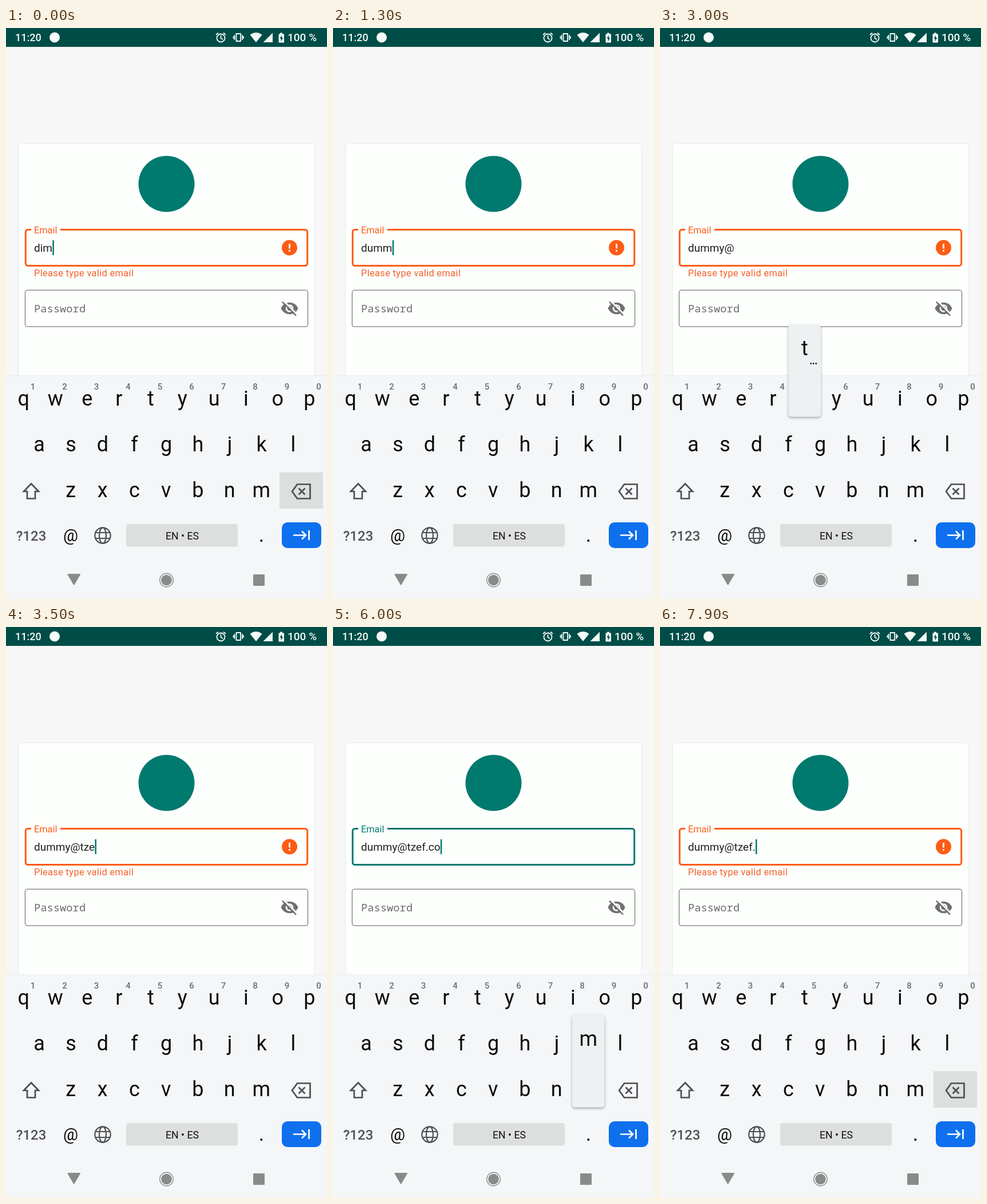
Animation, 561 px wide and 998 px high, one loop 8 s. Source, as an HTML page:

```html
<!DOCTYPE html>
<html lang="en">
<head>
<meta charset="utf-8">
<title>Email field validation</title>
<style>
  html, body { margin: 0; width: 100%; height: 100%; overflow: hidden; }
  svg { display: block; width: 561px; height: 998px; font-family: Roboto, sans-serif; }
  .key { font-size: 36px; text-anchor: middle; fill: #0b0c0c; }
  .hint { font-size: 15px; font-weight: 500; text-anchor: middle; fill: #6a6c6d; }
  .line { fill: none; stroke: #4c4e50; stroke-width: 2.7; }
  .status { font-weight: 500; fill: #f4fbf8; }
  #form { --tone: #00796f; }
  #form.error { --tone: #fd5c16; }
  #form:not(.error) #alert { display: none; }
  #outline { fill: none; stroke: var(--tone); stroke-width: 3; }
  #label { fill: var(--tone); font-size: 16.35px; }
  #popup { filter: drop-shadow(0 2px 2px #0005); }
</style>
</head>
<body>
<svg viewBox="0 0 561 998">
  <rect width="561" height="998" fill="#f6f7f6"/>
  <rect width="561" height="33" fill="#004d47"/>

  <g class="status">
    <text x="16" y="23" font-size="18">11:20</text>
    <text x="492" y="23" font-size="19">100 %</text>
    <circle cx="85" cy="16.500" r="9"/>
    <g fill="none" stroke="#f4fbf8" stroke-width="1.800">
      <circle cx="375.500" cy="17.500" r="7"/>
      <path d="M375.500 13v5l3.500 2M367 12l4-3.500M384 12l-4-3.500"/>
      <path d="M402.500 10h7.500v13h-7.500zM399.500 12v9M413 12v9M397.500 14.500v4M415 14.500v4"/>
    </g>
    <path d="M426.500 12Q437 4 447.500 12L437 25ZM449.500 25L466 8.500V25Z"/>
    <path d="M476.500 10.500h2.500v-2h4v2h3v15h-9.500z"/>
    <path d="M482 12.500l-3.500 6h2.200v5l3.500-6.500h-2.200z" fill="#004d47"/>
  </g>

  <rect x="22" y="202.500" width="517" height="420" rx="2" fill="#fdfffd" stroke="#e9ebea"/>
  <circle cx="280.500" cy="272.500" r="49" fill="#00796f"/>

  <g id="form">
    <rect id="outline" x="34.300" y="352.500" width="492.400" height="63" rx="4"/>
    <rect x="44" y="348" width="51" height="9" fill="#fdfffd"/>
    <text id="label" x="49" y="359">Email</text>
    <text id="value" x="49" y="391" font-size="19" fill="#1c1d1d"></text>
    <rect id="caret" y="371" width="2.500" height="26" fill="#00796f"/>
    <text id="message" x="49" y="434" font-size="16.350" letter-spacing=".37" fill="#f4602a">Please type valid email</text>
    <g id="alert">
      <circle cx="495.500" cy="384" r="13.500" fill="#fd5c16"/>
      <path d="M495.500 377v8.500M495.500 388v3" stroke="#fff" stroke-width="2.800"/>
    </g>
  </g>

  <rect x="33.500" y="458.300" width="494" height="63.700" rx="4" fill="none" stroke="#909190" stroke-width="1.600"/>
  <text x="49" y="496.500" font-size="18.800" fill="#6b6d6c" style="font-family:'Noto Sans Mono',monospace">Password</text>
  <g transform="translate(479.200 473.700) scale(1.360)">
    <path d="M1 12C2.700 7.600 7 4.500 12 4.500S21.300 7.600 23 12C21.300 16.400 17 19.500 12 19.500S2.700 16.400 1 12Z" fill="#6f7170"/>
    <circle cx="12" cy="12" r="5" fill="#fdfffd"/>
    <circle cx="12" cy="12" r="3" fill="#6f7170"/>
    <path d="M4.500 2.500L22 20" stroke="#fdfffd" stroke-width="2"/>
    <path d="M2.700 3.600L20.400 21.300" stroke="#6f7170" stroke-width="1.800"/>
  </g>

  <rect y="607.500" width="561" height="391" fill="#f4f6f8"/>
  <path d="M0 607.500H561" stroke="#e8ebec"/>
  <g id="keys"></g>
  <rect id="pressed" x="478" y="776.500" width="76" height="63.500" fill="#dddfde"/>
  <path class="line" d="M44 796.500L57 810H51V822.500H37V810H31Z"/>
  <path class="line" d="M509 797.500H531.500V822.500H509L500 810ZM511.500 804.500l11 11m0-11l-11 11"/>

  <text x="44" y="895.500" font-size="24" font-weight="500" text-anchor="middle" fill="#505254">?123</text>
  <g class="line" style="stroke-width:2.200">
    <circle cx="169" cy="887" r="13.700"/>
    <ellipse cx="169" cy="887" rx="6" ry="13.700"/>
    <path d="M156.500 882h25M156.500 892h25"/>
  </g>
  <rect x="210" y="867" width="195" height="39.500" rx="4" fill="#dddfde"/>
  <text x="308" y="893.500" font-size="17.700" text-anchor="middle" fill="#111">EN • ES</text>
  <rect x="482" y="864" width="69" height="45" rx="10" fill="#0f70ee"/>
  <path d="M502 886.500H524M517 879.500l7 7-7 7M529.500 878v17" fill="none" stroke="#fff" stroke-width="2.700"/>

  <g fill="#898b8b" stroke="#898b8b" stroke-linejoin="round">
    <path d="M108.500 955H129L118.700 972.500Z" stroke-width="2"/>
    <circle cx="280.500" cy="965" r="9.300" stroke="none"/>
    <circle cx="280.500" cy="965" r="11.800" fill="none" stroke-width="1.400"/>
    <rect x="432.500" y="955.500" width="19" height="19"/>
  </g>

  <g id="popup">
    <rect x="-28.300" y="-142" width="56.600" height="161.500" rx="5" fill="#eef0f2"/>
    <text id="popupKey" class="key" y="-88"></text>
    <g id="dots" fill="#222"><circle cx="11" cy="-73.500" r="1.400"/><circle cx="15.500" cy="-73.500" r="1.400"/><circle cx="20" cy="-73.500" r="1.400"/></g>
  </g>
</svg>
<script>
const LOOP = 8000, FADE = 170, INVALID_AT = 7600, VALID_AT = 5600;
const $ = id => document.getElementById(id);
const keys = {};

function addText(x, y, label, className) {
  const text = document.createElementNS('http://www.w3.org/2000/svg', 'text');
  text.setAttribute('x', x);
  text.setAttribute('y', y);
  text.setAttribute('class', className);
  text.textContent = label;
  $('keys').append(text);
  return text;
}

function addRow(letters, left, y) {
  [...letters].forEach((letter, i) => {
    const x = left + i * 55.5;
    keys[letter] = { x, y };
    addText(x, y, letter, 'key');
  });
}

addRow('qwertyuiop', 30.8, 660);
addRow('asdfghjkl', 58, 740);
addRow('zxcvbnm', 113.3, 820);
[...'1234567890'].forEach((digit, i) => addText(47 + i * 55.5, 632, digit, 'hint'));
keys['@'] = { x: 113, y: 900 };
keys['.'] = { x: 446.5, y: 900 };
addText(113, 897, '@', 'key').style.fontSize = '29px';
addText(446.5, 898, '.', 'key');

// [start, typed text with "|" as caret, key held down]
const steps = [
  [0, 'dim|', 'delete'], [100, 'di|'], [400, 'd|'],
  [800, 'd|', 'u'], [900, 'du|'], [1100, 'du|', 'm'], [1200, 'dum|', 'm'], [1300, 'dumm|'],
  [1400, 'dumm|', 'y'], [1500, 'dummy|'], [2000, 'dummy'],
  [2200, 'dummy', '@'], [2300, 'dummy@|'], [2800, 'dummy@'],
  [3000, 'dummy@', 't'], [3100, 'dummy@t|'], [3200, 'dummy@t|', 'z'], [3300, 'dummy@tz|'],
  [3400, 'dummy@tz|', 'e'], [3500, 'dummy@tze|'], [3600, 'dummy@tze|', 'f'], [3700, 'dummy@tzef|'],
  [4200, 'dummy@tzef'], [4500, 'dummy@tzef', '.'], [4600, 'dummy@tzef.|'], [5100, 'dummy@tzef.'],
  [5500, 'dummy@tzef.', 'c'], [5600, 'dummy@tzef.c|'], [5800, 'dummy@tzef.c|', 'o'],
  [5900, 'dummy@tzef.co|'], [6000, 'dummy@tzef.co|', 'm'], [6100, 'dummy@tzef.com|'],
  [6600, 'dummy@tzef.com'], [6700, 'dummy@tzef.co|'], [7300, 'dummy@tzef.c|'],
  [7600, 'dummy@tzef.|'], [7900, 'dummy@tzef.|', 'delete']
];

const clamp = v => Math.max(0, Math.min(1, v));
const show = (id, visible) => $(id).style.display = visible ? '' : 'none';

function render(time) {
  const [, typed, held] = steps.findLast(step => step[0] <= time);
  $('value').textContent = typed.replace('|', '');
  $('caret').setAttribute('x', 49.3 + $('value').getComputedTextLength());
  show('caret', typed.endsWith('|'));
  show('pressed', held === 'delete');

  const key = keys[held];
  show('popup', key);
  if (key) {
    $('popup').setAttribute('transform', `translate(${key.x} ${key.y})`);
    $('popupKey').textContent = held;
    show('dots', 'qwertyuiopascn.'.includes(held));
  }

  $('form').classList.toggle('error', time < VALID_AT || time >= INVALID_AT);
  const fade = time < INVALID_AT ? 1 - (time - VALID_AT) / FADE : (time - INVALID_AT) / FADE;
  $('message').setAttribute('opacity', clamp(fade));
}

function tick() {
  render(performance.now() % LOOP);
  requestAnimationFrame(tick);
}
tick();
</script>
</body>
</html>
```
